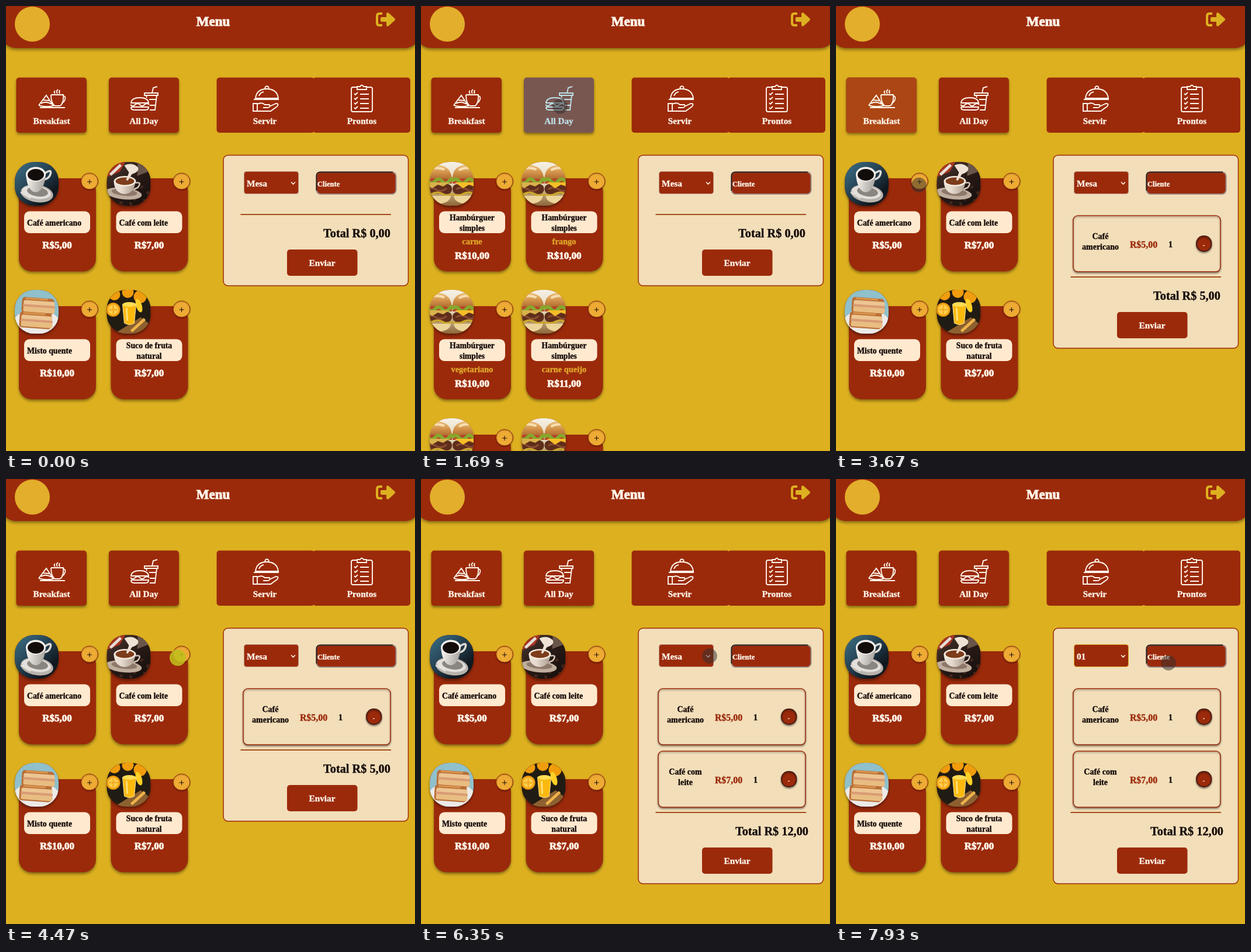
An HTML page with a canvas that plays this animation: 700x762 px, repeating every 8 s.

```html
<!DOCTYPE html>
<html lang="pt">
<head>
<meta charset="utf-8">
<title>Menu</title>
<style>
html, body { margin: 0; width: 100%; height: 100%; overflow: hidden; background: #ddb020; }
canvas { display: block; }
</style>
</head>
<body>
<canvas id="stage" width="700" height="762"></canvas>
<script>
const ctx = document.getElementById('stage').getContext('2d');
const LOOP = 8000, ROW = 107;
const RED = '#9b2a0b', GOLD = '#ddb020', CREAM = '#f2deb9', LABEL = '#ffe9cf', INK = '#140a08', WHITE = '#fff6ea';

// Drawing helpers
function box(color, x, y, w, h, r = 0, stroke, line = 1.5) {
  ctx.beginPath();
  ctx.roundRect(x, y, w, h, r);
  if (color) { ctx.fillStyle = color; ctx.fill(); }
  if (stroke) { ctx.strokeStyle = stroke; ctx.lineWidth = line; ctx.stroke(); }
}
function oval(color, x, y, rx, ry = rx, turn = 0, stroke, line = 1) {
  ctx.beginPath();
  ctx.ellipse(x, y, rx, ry, turn, 0, 7);
  ctx.fillStyle = color; ctx.fill();
  if (stroke) { ctx.strokeStyle = stroke; ctx.lineWidth = line; ctx.stroke(); }
}
function path(d, stroke, line = 1.5, fill) {
  const p = new Path2D(d);
  if (fill) { ctx.fillStyle = fill; ctx.fill(p); }
  if (stroke) { ctx.strokeStyle = stroke; ctx.lineWidth = line; ctx.stroke(p); }
}
// A thin outline thickens the hairlines to a slab-like weight
function text(s, x, y, size, color, align = 'center', weight = .35) {
  ctx.font = `bold ${size}px "Liberation Serif", serif`;
  ctx.textAlign = align;
  ctx.fillStyle = ctx.strokeStyle = color;
  ctx.lineWidth = weight;
  ctx.fillText(s, x, y);
  ctx.strokeText(s, x, y);
}
function shadowed(draw, dy = 3, blur = 4) {
  ctx.save();
  ctx.shadowColor = 'rgba(0,0,0,.4)';
  ctx.shadowOffsetY = dy;
  ctx.shadowBlur = blur;
  draw();
  ctx.restore();
}
function at(x, y, draw) {
  ctx.save();
  ctx.translate(x, y);
  draw();
  ctx.restore();
}
function fade(x, y, ...colors) {
  const g = ctx.createLinearGradient(0, 0, x, y);
  colors.forEach((c, i) => g.addColorStop(i / (colors.length - 1), c));
  return g;
}

// Dish pictures, each in a 75 x 75 square
const pictures = {
  coffee() {
    box(fade(55, 60, '#3d7186', '#28485a', '#10181f'), 0, 0, 75, 75);
    oval('#b9b3ae', 38, 54, 28, 15, .15);
    oval('#e3dfda', 37, 52, 25, 11, .15);
    oval('#8b8580', 39, 51, 18, 8, .15);
    path('M52 19 q12 -8 9 2 q-2 7 -10 9', '#dedad5', 3.5);
    path('M19 22 Q22 51 36 52 Q50 51 53 22z', 0, 0, fade(55, 10, '#fffdf9', '#f0ece6', '#a9a5a1'));
    oval('#f5f1ec', 36, 21, 17, 12.5);
    oval('#120c0a', 36, 22, 14, 10);
    path('M10 52 L27 62', '#e5e1db', 2.5);
  },
  latte() {
    box(fade(60, 75, '#4a3a33', '#2a1b17', '#17100e'), 0, 0, 75, 75);
    path('M0 0 H32 L22 17 L0 26z', 0, 0, '#a53521');
    path('M6 22 L24 5', '#e6ded5', 5);
    path('M53 0 H75 V15 L52 24z', 0, 0, '#6a554a');
    for (let i = 0; i < 24; i++) oval('#46291d', i * 29 % 75, 40 + i * 17 % 36, 3, 2, i);
    oval('#bfae9e', 29, 54, 31, 10, .1);
    oval('#8d7869', 30, 52, 22, 6, .1);
    path('M12 33 Q13 54 31 55 Q48 53 49 33z', 0, 0, fade(50, 0, '#efe6dc', '#e6dace', '#a8988a'));
    path('M49 36 q12 -3 4 8 l-7 3', '#d7c8ba', 2.5);
    oval('#f4eadf', 31, 33, 19, 9);
    oval('#7d3c1b', 31, 33, 16, 6.5);
    path('M30 6 Q43 0 53 9 Q57 16 43 21 L36 32 L33 31 L38 18z', 0, 0, '#eee2d5');
  },
  toast() {
    box('#8fc0cb', 0, 0, 75, 75);
    oval('#eceae7', 37, 55, 39, 21);
    for (const [x, y] of [[13, 12], [9, 37]]) at(x, y, () => {
      ctx.rotate(.07);
      box('#b96d35', 0, 0, 55, 27, 5);
      box('#ecc592', 3, 5, 53, 9, 3);
      box('#d99b74', 2, 12, 55, 5, 2);
      box('#e8bd82', 3, 16, 54, 9, 3);
      path('M6 2 H44', '#d9954d', 3);
    });
  },
  juice() {
    box('#211c13', 0, 0, 75, 75);
    path('M13 75 L58 47 L75 60 V75z', 0, 0, '#8d6030');
    for (const [x, y, r] of [[13, 8, 10], [36, 4, 10], [57, 12, 11], [11, 34, 12]])
      oval('#f09c0c', x, y, r);
    oval('#ffcb48', 11, 34, 9);
    path('M11 26 V42 M3 34 H19', '#ed9e15', 1.5);
    oval('#ffd026', 55, 27, 5, 12, -.3);
    path('M27 25 H50 L47 57 Q39 62 30 57z', '#ffe7a0', 1, '#fbb90d');
    oval('#ffdd55', 38.5, 25, 11.5, 4);
    path('M34 31 L35 53', '#ffe07a', 3);
    path('M42 71 L65 50', '#edb34a', 5);
  },
  burger() {
    box(fade(0, 75, '#f6f1e6', '#e3d5b8', '#8d6636'), 0, 0, 75, 75);
    for (const x of [-15, 38]) at(x, 4, () => {
      path('M1 26 Q0 2 26 1 Q52 2 53 26z', 0, 0, fade(0, 28, '#eec583', '#d3934a', '#a8642a'));
      path('M12 10 Q25 3 40 9', '#f7dfb0', 4);
      path('M1 27 Q27 21 53 27 V33 H1z', 0, 0, '#b8412a');
      path('M0 29 q6 -7 12 0 t12 0 t12 0 t12 0 t8 -2', '#86a82c', 6);
      box('#5f2d1b', 1, 34, 52, 17, 8);
      path('M7 43 q9 -6 18 0 t19 -2', '#8b4c31', 3);
      path('M5 31 H49 L38 38 L29 35 L19 41z', 0, 0, x > 0 ? '#f7bd28' : '#d9b14c');
      path('M1 51 q9 5 18 0 t18 0 t16 0', '#c9a52f', 4);
      path('M3 54 H51 Q50 67 27 68 Q4 67 3 54z', 0, 0, '#ecd49a');
    });
  }
};

const burger = (kind, price) => ({ pic: 'burger', lines: ['Hambúrguer', 'simples'], kind, price });
const breakfast = [
  { pic: 'coffee', lines: ['Café americano'], price: '5,00' },
  { pic: 'latte', lines: ['Café com leite'], price: '7,00' },
  { pic: 'toast', lines: ['Misto quente'], price: '10,00' },
  { pic: 'juice', lines: ['Suco de fruta', 'natural'], price: '7,00' }
];
const allDay = [
  burger('carne', '10,00'), burger('frango', '10,00'), burger('vegetariano', '10,00'),
  burger('carne queijo', '11,00'), burger('frango queijo', '11,00'), burger('vegetariano', '11,00')
];

function card({ pic, lines, kind, price }, i) {
  at(i % 2 * 157.5, Math.round(Math.floor(i / 2) * 219.3), () => {
    shadowed(() => box(RED, 22, 295, 132, 159.5, 22));
    shadowed(() => box(RED, 15, 267, 75, 75, 33));
    ctx.save();
    ctx.beginPath();
    ctx.roundRect(15, 267, 75, 75, 33);
    ctx.clip();
    at(15, 267, pictures[pic]);
    ctx.restore();
    shadowed(() => oval('#eeab34', 143, 300, 14.5, 14, 0, RED), 1, 2);
    path('M139 301 H147 M143 297 V305', INK, 1);
    box(LABEL, 31, 351.5, 113, 37.5, 9);
    if (lines.length > 1) lines.forEach((s, n) => text(s, 87.5, 367 + 18 * n, 13.7, INK));
    else text(lines[0], 36, 376, 13.8, INK, 'left');
    if (kind) text(kind, 87.5, 408, 14.4, '#e2a92b');
    text('R$' + price, 87.5, kind ? 433 : 415, 17, WHITE, 'center', .8);
  });
}

const icons = [
  'M58 174 H101 M56 170 L69 153 L81 171 Q67 174 56 170 M60 167 Q68 162 78 168 M64 161 L74 162 M77 152 H98 Q99 168 92 171 H84 Q77 167 77 152 M97 154 Q103 154 101 160 Q99 166 95 166 M84 150 q-3 -3 0 -5 M88 150 q-3 -4 1 -7 M92 150 q-2 -3 0 -6',
  'M214 166 Q215 157 229 157 Q243 157 244 166z M213 169 q4 4 8 0 t8 0 t8 0 t8 0 M214 173 H244 Q244 178 239 178 H219 Q214 178 214 173 M237 149 H260 V153 H237z M240 153 L241 157 M258 153 L255 178 H246 M250 149 L252 140 L259 138 M245 160 H257 M246 170 H256',
  'M427 158 Q429 142 446 142 Q464 142 466 158z M424 160 H467 M444 142 a3 3 0 1 1 5 0 M433 154 Q435 148 441 147 M423 167 H430 V180 H423z M430 168 Q438 164 443 169 H451 Q453 174 447 174 H440 M451 172 L462 167 Q468 167 464 172 L453 180 H430',
  'M600 139 H594 Q591 139 591 142 V178 Q591 181 594 181 H624 Q627 181 627 178 V142 Q627 139 624 139 H618 M601 143 V138 H606 Q609 133 612 138 H617 V143z M596 150 l2 2 l4 -4 M596 158 l2 2 l4 -4 M596 166 l2 2 l4 -4 M596 174 l2 2 l4 -4 M606 151 H621 M606 159 H621 M606 167 H621 M606 175 H621'
];

function header() {
  shadowed(() => box(RED, -8, -40, 716, 112, 25), 3, 5);
  oval('#e3ae2b', 45, 31, 30);
  text('Menu', 354.5, 34, 23, WHITE, 'center', 1);
  path('M644 13 H639 Q635 13 635 17 V29 Q635 33 639 33 H644', GOLD, 4);
  path('M643 19 H651 V13 Q652 10 655 12 L665 21 Q667 23 665 25 L655 34 Q652 36 651 33 V27 H643 Q641 27 641 25 V21 Q641 19 643 19', 0, 0, GOLD);
}

// Touch glow fades away shortly after a tap
const glow = (t, start) => t < start ? 0 : .4 * Math.max(0, Math.min(1, 1 - (t - start - 40) / 210));

function tabs(t) {
  shadowed(() => { box(RED, 17.5, 122.5, 120.5, 94.5, 5); box(RED, 176, 122.5, 120, 94.5, 5); });
  box(RED, 360.5, 122.5, 167.5, 94.5, 5);
  box(RED, 525, 122.5, 167, 94.5, 5);
  if (t >= 2600 && t < 3740) box('#ac4614', 17.5, 122.5, 120.5, 94.5, 5);
  icons.forEach(d => path(d, WHITE, 1.9));
  ['Breakfast', 'All Day', 'Servir', 'Prontos'].forEach((s, i) => text(s, [78, 236, 443, 609][i], 202, 15.2, WHITE));
  box(`rgba(51,181,229,${glow(t, 2390)})`, 17.5, 122.5, 120.5, 94.5, 5);
  box(`rgba(51,181,229,${glow(t, 1610)})`, 176, 122.5, 120, 94.5, 5);
}

function order(t) {
  const items = t < 3670 ? 0 : t < 4600 ? 1 : 2;
  const total = ['0,00', '5,00', '12,00'][items];
  box(CREAM, 372, 255.5, 316.5, 223.5 + ROW * items, 8, RED);

  box(RED, 407.5, 283.5, 93, 38, 4, t >= 6420 ? '#e0a92c' : '#b98a78', 1);
  text(t < 7650 ? 'Mesa' : '01', 412, 309, 15.4, WHITE, 'left');
  path('M488 301.5 l3.5 3.5 l3.5 -3.5', WHITE, 1.6);
  box(RED, 531.5, 284.5, 136, 37.5, 7, '#9a8580', 2);
  path('M531.5 316 V291 Q531.5 284.5 538 284.5 H662', '#2b1a18', 2);
  text('Cliente', 533, 309, 12.5, WHITE, 'left');

  breakfast.slice(0, items).forEach(({ lines, price }, i) => at(0, ROW * i, () => {
    shadowed(() => box(CREAM, 406, 359, 252, 96, 8, RED), 2, 3);
    const [first, second] = i ? ['Café com', 'leite'] : lines[0].split(' ');
    text(first, 452.5, 399, 14, INK);
    text(second, 452.5, 417, 14, INK);
    text('R$' + price, 526.5, 414, 15.9, RED);
    text('1', 572.5, 413, 14.5, INK);
    shadowed(() => box(RED, 617, 394, 25.5, 26, 12, '#4a1c14', 1.8), 2, 3);
    text('-', 629.5, 413, 10, WHITE);
  }));

  at(0, ROW * items, () => {
    path('M401.5 357 H659', '#a5501c', 1.8);
    text('Total R$ ' + total, 600.5, 396, 20.3, INK);
    box(RED, 481, 417, 120.5, 45, 5);
    text('Enviar', 541, 445, 15.3, WHITE);
  });
}

function dropdown(hoverY) {
  const rowHeight = 41, hovered = Math.max(0, Math.floor((hoverY - 322) / rowHeight));
  shadowed(() => box(RED, 407, 322, 94, rowHeight * 6 + 2));
  ['Mesa', '01', '02', '03', '04', '05'].forEach((s, i) => {
    const y = 322 + rowHeight * i;
    if (i === hovered) box('#1967d2', 408, y, 92, rowHeight);
    text(s, 412, y + 26, 15.4, WHITE, 'left');
  });
}

// Touch point: time, x, y
const track = [
  [460, 548, 664], [740, 460, 548], [900, 348, 473], [1220, 213, 171], [1500, 238, 172],
  [2000, 238, 172], [2350, 78, 166], [2640, 78, 166], [2850, 86, 180], [3250, 140, 294], [3540, 142, 307],
  [3800, 142, 306], [4400, 294, 306], [4930, 294, 306], [5330, 482, 314], [5560, 482, 314],
  [5680, 491, 313], [5960, 491, 312], [6200, 494, 303], [6420, 494, 303], [6760, 516, 310],
  [7500, 460, 384], [7650, 460, 384], [7930, 569, 315], [LOOP, 569, 315]
];
function touchAt(t) {
  const i = track.findIndex(k => k[0] > t);
  const [t0, x0, y0] = track[i - 1], [t1, x1, y1] = track[i];
  const p = (t - t0) / (t1 - t0);
  return [x0 + (x1 - x0) * p, y0 + (y1 - y0) * p];
}

function draw(t) {
  box(GOLD, 0, 0, 700, 762);
  header();
  tabs(t);
  (t >= 1620 && t < 2430 ? allDay : breakfast).forEach(card);
  order(t);
  if (t < track[0][0]) return;
  const [x, y] = touchAt(t);
  if (t >= 6420 && t < 7650) dropdown(y);
  if (t >= 4400 && t < 4600) oval('rgba(192,190,28,.88)', x, y, 14);
  else oval('rgba(50,45,45,.5)', x, y, 12.5, 12.5, 0, 'rgba(50,45,45,.3)');
}

function frame() {
  draw(performance.now() % LOOP);
  requestAnimationFrame(frame);
}
frame();
</script>
</body>
</html>
```
